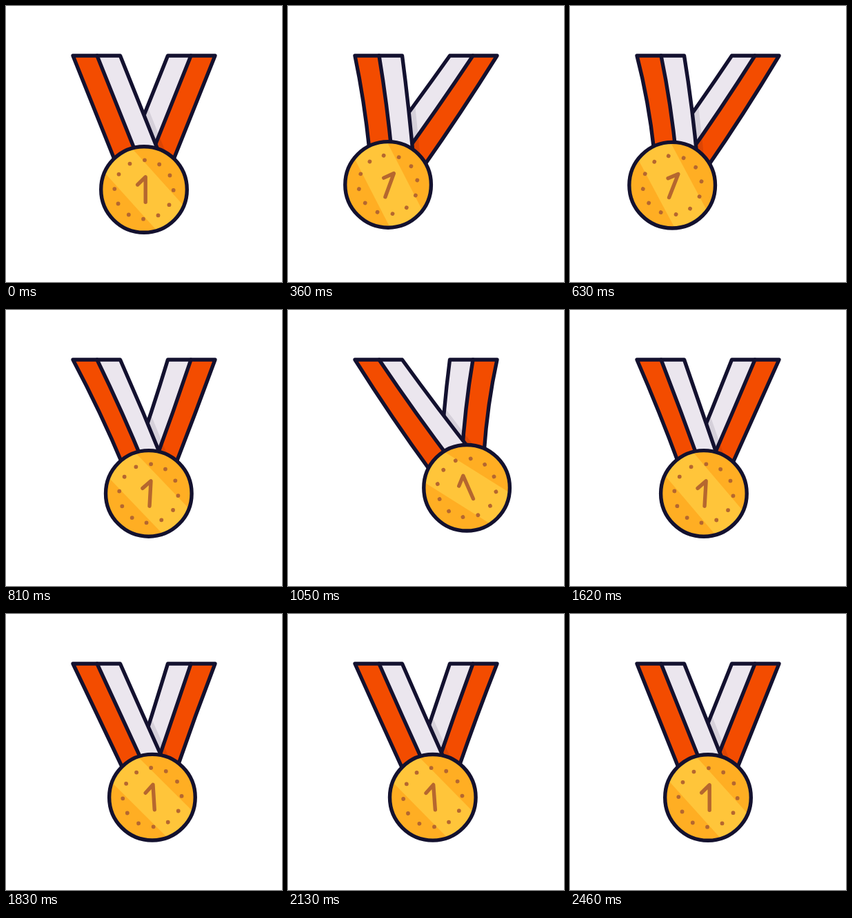
Animation of 400x400 px, one loop 5.09 s. Source, as an HTML page with a canvas:

```html
<!DOCTYPE html>
<html lang="en">
<head>
<meta charset="utf-8">
<title>Swinging medal</title>
<style>
html, body { margin: 0; width: 100%; height: 100%; overflow: hidden; background: #fff; }
canvas { display: block; width: 100vmin; height: 100vmin; }
</style>
</head>
<body>
<canvas id="stage"></canvas>
<script>
const LOOP = 5090, STEP = 30, LAG = 35, SETTLE = 2430;
const PIVOT = { x: 200, y: 50 }, ARM = 216, REST = { x: 200, y: 266 };
const TOP = 72, END = 226, SLOPE = 0.4, REACH = 62.5, PINCH = 4.5;
const INK = '#13112f', RED = '#f34c00', PALE = '#ebe6ee';
const GOLD = '#ffae23', SHINE = '#ffc53a', BROWN = '#b5672f';

// Swing extremes: time, sideways offset, easing skew of the move that leads there
const SWING = [
  [0, 0, 1], [515, -59, 0.52], [1000, REACH, 1.29],
  [1460, -13.5, 0.9], [1930, 15, 1], [SETTLE, 0, 1]
];

const canvas = document.getElementById('stage');
const ctx = canvas.getContext('2d');
const ratio = window.devicePixelRatio || 1;
canvas.width = canvas.height = Math.round(Math.min(innerWidth, innerHeight) * ratio) || 400;

function offset(t) {
  if (t <= 0) return 0;
  for (let i = 1; i < SWING.length; i++) {
    const [t0, x0] = SWING[i - 1], [t1, x1, skew] = SWING[i];
    if (t < t1) {
      const u = Math.pow((t - t0) / (t1 - t0), skew);
      return x0 + (x1 - x0) * (1 - Math.cos(Math.PI * u)) / 2;
    }
  }
  return 0;
}

const swingAngle = t => Math.asin(offset(t) / ARM);

function pose(t) {
  const a = swingAngle(t);
  const spin = -1.42 * swingAngle(t - LAG);
  const stir = Math.sin(Math.PI * Math.min(t / SETTLE, 1));
  return {
    x: PIVOT.x + ARM * Math.sin(a),
    y: PIVOT.y + ARM * Math.cos(a),
    tilt: -a,
    spin,
    pull: (spin - a) / 2,
    pinch: PINCH * stir * (1 - (offset(t) / REACH) ** 2)
  };
}

function rotate(x, y, a) {
  const c = Math.cos(a), s = Math.sin(a);
  return { x: x * c - y * s, y: x * s + y * c };
}

// One long edge of a strap: fixed on top, carried by the medal below.
// side is 1 for the outer edge, 0 for the seam, -1 for the inner edge.
function edge(x, side, dir, m) {
  const foot = x + dir * (SLOPE * (END - TOP) + side * m.pinch);
  const end = rotate(foot - REST.x, END - REST.y, m.pull);
  end.x += m.x;
  end.y += m.y;
  const half = (end.y - TOP) / 2;
  const d = rotate(dir * SLOPE, 1, m.pull);
  const bend = m.pull * dir > 0 ? 0.65 : 0.3;
  const mid = { x: (x + end.x) / 2, y: (TOP + end.y) / 2 };
  return {
    start: { x, y: TOP },
    ctrl: {
      x: mid.x + (end.x - d.x * half - mid.x) * bend,
      y: mid.y + (end.y - d.y * half - mid.y) * bend
    },
    end
  };
}

function traceEdge(e) {
  ctx.moveTo(e.start.x, e.start.y);
  ctx.quadraticCurveTo(e.ctrl.x, e.ctrl.y, e.end.x, e.end.y);
}

function traceBand(a, b, dx = 0) {
  ctx.beginPath();
  traceEdge(a);
  ctx.lineTo(b.end.x + dx, b.end.y);
  ctx.quadraticCurveTo(b.ctrl.x + dx, b.ctrl.y, b.start.x + dx, b.start.y);
  ctx.closePath();
}

function fillBand(a, b, color) {
  traceBand(a, b);
  ctx.fillStyle = color;
  ctx.fill();
}

function drawStrap([outer, seam, inner], shadeEdge) {
  fillBand(outer, seam, RED);
  fillBand(seam, inner, PALE);
  if (shadeEdge) {
    ctx.save();
    traceBand(outer, inner);
    ctx.clip();
    traceBand(shadeEdge, shadeEdge, 10);
    ctx.fillStyle = 'rgba(19, 17, 47, 0.1)';
    ctx.fill();
    ctx.restore();
  }
  ctx.strokeStyle = INK;
  ctx.lineWidth = 5.4;
  ctx.beginPath();
  traceEdge(seam);
  ctx.stroke();
  traceBand(outer, inner);
  ctx.stroke();
}

function drawMedal(m) {
  ctx.save();
  ctx.translate(m.x, m.y);

  ctx.beginPath();
  ctx.arc(0, 0, 62.3, 0, 2 * Math.PI);
  ctx.fillStyle = GOLD;
  ctx.fill();
  ctx.save();
  ctx.clip();
  ctx.rotate(m.tilt + 48 * Math.PI / 180);
  ctx.fillStyle = SHINE;
  ctx.fillRect(-70, -27, 140, 53);
  ctx.restore();
  ctx.strokeStyle = INK;
  ctx.lineWidth = 5.4;
  ctx.stroke();

  ctx.rotate(m.spin);
  ctx.fillStyle = BROWN;
  for (let i = 0; i < 12; i++) {
    const a = (i * 30 + 1.3) * Math.PI / 180;
    ctx.beginPath();
    ctx.arc(42.7 * Math.sin(a), -42.7 * Math.cos(a), 2.9, 0, 2 * Math.PI);
    ctx.fill();
  }
  ctx.strokeStyle = BROWN;
  ctx.lineWidth = 5.4;
  ctx.beginPath();
  ctx.moveTo(-9.3, -7);
  ctx.lineTo(2.2, -18.2);
  ctx.lineTo(2.2, 18.2);
  ctx.stroke();
  ctx.restore();
}

function draw(t) {
  const m = pose(t);
  const k = canvas.width / 400;
  ctx.setTransform(k, 0, 0, k, 0, 0);
  ctx.fillStyle = '#fff';
  ctx.fillRect(0, 0, 400, 400);
  ctx.lineCap = ctx.lineJoin = 'round';

  const front = [97, 132, 165.5].map((x, i) => edge(x, 1 - i, 1, m));
  const back = [303, 268, 234.5].map((x, i) => edge(x, 1 - i, -1, m));
  drawStrap(back, front[2]);
  drawStrap(front);
  drawMedal(m);
}

const begin = performance.now();
function tick() {
  const t = (performance.now() - begin) % LOOP;
  draw(Math.floor(t / STEP) * STEP);
  requestAnimationFrame(tick);
}
tick();
</script>
</body>
</html>
```
